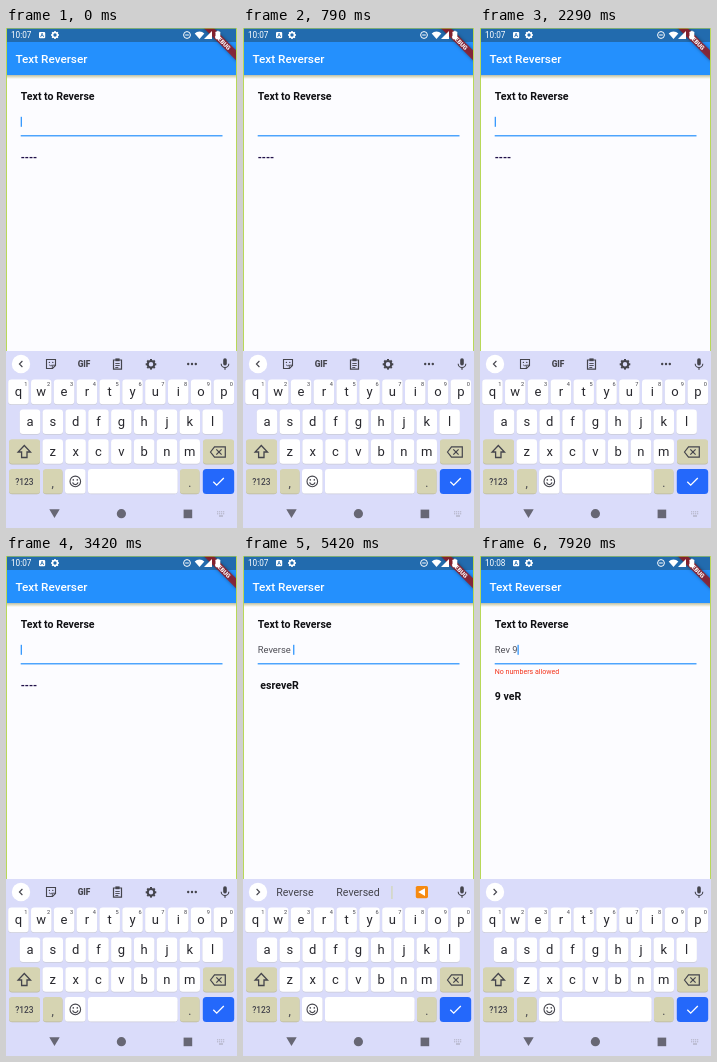
Write an HTML page with a canvas that moves like this. It is 231 by 500 pixels and loops after 8000 ms.

```html
<!DOCTYPE html>
<html lang="en">
<head>
<meta charset="utf-8">
<title>Text Reverser</title>
<style>
html, body { margin: 0; width: 100%; height: 100%; overflow: hidden; background: #fcfcff; }
canvas { display: block; width: 231px; height: 500px; }
</style>
</head>
<body>
<canvas id="stage"></canvas>
<script>
const W = 231, H = 500, LOOP = 8000;
const BLUE = '#2490fd', INK = '#44444c', BOARD = '#dadcfa', TAN = '#d6d4b2';
const canvas = document.getElementById('stage');
const dpr = window.devicePixelRatio || 1;
canvas.width = W * dpr;
canvas.height = H * dpr;
const c = canvas.getContext('2d');

// Time of each edit, field text, suggestions (null shows the tool icons)
const edits = [
  [0, '', null],
  [3920, 'R', ['R', 'Re', 'Really']],
  [4200, 'Re', ['Re', 'Really', 'Ready']],
  [4480, 'Rev', ['Rev', 'Reverse', 'Review']],
  [4680, 'Reve', ['Reve', 'Reverse', 'Revenge']],
  [4860, 'Rever', ['Rever', 'Reverse', 'Revert']],
  [5010, 'Revers', ['Revers', 'Reverse', 'Reversed']],
  [5170, 'Reverse', ['Reverse', 'Reversed', '\u25c0']],
  [5340, 'Reverse ', ['Reverse', 'Reversed', '\u25c0']],
  [6350, 'Reverse', ['Reverse', 'Reversed', '\u25c0']],
  [6510, 'Revers', ['Revers', 'Reverse', 'Reversed']],
  [6670, 'Rever', ['Rever', 'Reverse', 'Revert']],
  [6830, 'Reve', ['Reve', 'Reverse', 'Revenge']],
  [7030, 'Rev', ['Rev', 'Reverse', 'Review']],
  [7250, 'Rev ', []],
  [7640, 'Rev 9', []]
];

function rect(x, y, w, h, fill) {
  c.fillStyle = fill;
  c.fillRect(x, y, w, h);
}

function round(x, y, w, h, r, fill) {
  c.fillStyle = fill;
  c.beginPath();
  c.roundRect(x, y, w, h, r);
  c.fill();
}

function disc(x, y, r, fill) {
  c.fillStyle = fill;
  c.beginPath();
  c.arc(x, y, r, 0, 7);
  c.fill();
}

function ring(x, y, r, stroke, width) {
  c.strokeStyle = stroke;
  c.lineWidth = width;
  c.beginPath();
  c.arc(x, y, r, 0, 7);
  c.stroke();
}

function trace(points) {
  c.beginPath();
  for (let i = 0; i < points.length; i += 2) c.lineTo(points[i], points[i + 1]);
}

function line(points, stroke, width, closed) {
  trace(points);
  if (closed) c.closePath();
  c.strokeStyle = stroke;
  c.lineWidth = width;
  c.stroke();
}

function poly(points, fill) {
  trace(points);
  c.fillStyle = fill;
  c.fill();
}

function text(s, x, y, size, fill, weight = 400, align = 'left') {
  c.font = `${weight} ${size}px Roboto, sans-serif`;
  c.textAlign = align;
  c.fillStyle = fill;
  c.fillText(s, x, y);
}

function gear(x, y, r, color) {
  ring(x, y, r * 0.62, color, r * 0.4);
  for (let i = 0; i < 8; i++) {
    const a = i * Math.PI / 4, u = Math.cos(a), v = Math.sin(a);
    line([x + u * r * 0.7, y + v * r * 0.7, x + u * r, y + v * r], color, r * 0.38);
  }
}

function statusBar(t) {
  rect(0, 0, W, 14, '#226bae');
  text(t < 6250 ? '10:07' : '10:08', 5, 10.4, 8.2, '#fff');
  round(33, 4, 6.2, 6.2, 1, '#fff');
  text('A', 36.1, 9.2, 5.5, '#226bae', 700, 'center');
  gear(49, 7, 4, '#fff');
}

function statusIcons() {
  ring(181, 7, 3.4, '#fff', 1);
  rect(179.2, 6.5, 3.6, 1, '#fff');
  c.fillStyle = '#fff';
  c.beginPath();
  c.moveTo(193.5, 11);
  c.arc(193.5, 10.5, 7, -2.33, -0.81);
  c.fill();
  poly([198, 11, 206, 11, 206, 3], '#fff');
  round(209.5, 3.6, 4.8, 7.6, 0.7, '#fff');
  rect(211, 2.8, 1.8, 1, '#fff');
}

function banner() {
  c.save();
  c.translate(W, 0);
  c.rotate(Math.PI / 4);
  c.shadowColor = 'rgba(0,0,0,.5)';
  c.shadowBlur = 3.5 * dpr;
  rect(-24, 16.5, 48, 7, 'rgba(160,24,28,.78)');
  c.shadowColor = 'transparent';
  text('DEBUG', 0, 22.1, 6, '#fff', 900, 'center');
  c.restore();
}

function appBar() {
  rect(0, 14, W, 33, BLUE);
  const shade = c.createLinearGradient(0, 47, 0, 51);
  shade.addColorStop(0, '#b9bda8');
  shade.addColorStop(0.5, '#e2e0c8');
  shade.addColorStop(1, '#fcfcff');
  rect(0, 47, W, 4, shade);
  text('Text Reverser', 9.4, 34.8, 11.76, '#fff', 500);
}

function field(t, edit) {
  const [since, value] = edit;
  const age = t - since;
  const invalid = /\d/.test(value);
  text('Text to Reverse', 14.7, 71.8, 10.58, '#101014', 700);
  text(value, 14.7, 97, 9.4, '#505058');
  const end = 14.7 + c.measureText(value).width;
  if (value && !value.includes(' ')) rect(14.7, 98.4, end - 14.7, 0.8, '#77784a');
  if (age % 1000 < 500) rect(end, 88.8, 1.2, 10, BLUE);
  rect(14.7, 107.2, 201.8, 1.2, BLUE);
  if (invalid) {
    const k = Math.min(1, age / 167);
    c.globalAlpha = k;
    text('No numbers allowed', 14.7, 117.6 - 2 * (1 - k), 7.06, '#f4341c');
    c.globalAlpha = 1;
  }
  const result = [...value].reverse().join('') || '----';
  text(result, 14.7, invalid ? 143.9 : 132.8, 10.58, value ? '#101014' : '#201048', 700);
}

function microphone(x, y) {
  round(x - 1.8, y - 5.8, 3.6, 7.4, 1.8, INK);
  c.strokeStyle = INK;
  c.lineWidth = 1.1;
  c.beginPath();
  c.arc(x, y - 0.3, 3.8, 0, Math.PI);
  c.stroke();
  rect(x - 0.6, y + 3.4, 1.2, 2.4, INK);
}

function tools() {
  line([40.5, 331.5, 49.5, 331.5, 49.5, 337.5, 46.5, 340.5, 40.5, 340.5], INK, 1.1, true);
  line([49.5, 337.2, 46.3, 337.2, 46.3, 340.5], INK, 0.9);
  disc(43.4, 334.4, 0.7, INK);
  disc(46.8, 334.4, 0.7, INK);
  line([43, 336.8, 44.8, 337.8, 46, 337], INK, 0.8);

  text('GIF', 78, 339.1, 8.3, INK, 900, 'center');

  line([107.5, 332, 115.5, 332, 115.5, 341.2, 107.5, 341.2], INK, 1.2, true);
  rect(109.4, 330.4, 4.2, 2.8, INK);
  for (const y of [335, 337, 339]) rect(109.3, y, y > 338 ? 3 : 4.4, 0.9, INK);

  gear(145, 336.3, 5.3, INK);
  for (const x of [182.2, 186, 189.8]) disc(x, 336, 1.2, INK);
}

function suggestions(words) {
  words.forEach((word, i) => {
    const x = 52 + i * 63;
    if (word === '\u25c0') {
      round(172.8, 330, 12.2, 12.2, 1.6, '#f68a10');
      poly([175.2, 336.1, 182, 332.3, 182, 339.9], '#fff');
    } else {
      text(word, x, 339.9, 10.58, INK, 400, 'center');
    }
  });
  if (words.length) rect(148.5, 330, 0.9, 13, '#cdd49a');
}

function key(x, y, w, fill) {
  round(x, y + 0.7, w, 24.6, 3.2, fill === '#fff' ? '#c9cad8' : '#bbb99f');
  round(x, y, w, 24.6, 3.2, fill);
}

function letters(row, first, y, hints) {
  [...row].forEach((ch, i) => {
    const x = first + i * 22.83;
    key(x - 10.2, y, 20.4, '#fff');
    text(ch, x, y + 16.3, 13, '#28282e', 400, 'center');
    if (hints) text((i + 1) % 10, x + 7.4, y + 6.6, 5.6, INK, 400, 'center');
  });
}

function keyboard(words) {
  rect(0, 323, W, 177, BOARD);
  disc(15, 336, 9.2, '#fff');
  const d = words ? 1 : -1;
  line([15 - d * 1.4, 333, 15 + d * 1.6, 336, 15 - d * 1.4, 339], INK, 1.1);
  if (words) suggestions(words);
  else tools();
  microphone(219, 336);

  letters('qwertyuiop', 12.4, 351.6, true);
  letters('asdfghjkl', 24, 381.4);
  letters('zxcvbnm', 46.8, 411.2);

  key(3, 411.2, 31, TAN);
  line([18.3, 417.5, 24.5, 424, 21, 424, 21, 429.5, 15.6, 429.5, 15.6, 424, 12.1, 424], INK, 1.3, true);
  key(197, 411.2, 31, TAN);
  line([204.5, 424, 208.5, 418.8, 219.3, 418.8, 219.3, 429.2, 208.5, 429.2], INK, 1.2, true);
  line([210.3, 421.4, 215.6, 426.7], INK, 1.2);
  line([215.6, 421.4, 210.3, 426.7], INK, 1.2);

  key(3, 441, 31, TAN);
  text('?123', 18.4, 456.8, 8.4, INK, 500, 'center');
  key(37, 441, 19.5, TAN);
  text(',', 46.8, 458.5, 12, INK, 400, 'center');
  key(59, 441, 20.5, '#fff');
  ring(69.3, 453.4, 5.3, INK, 1.1);
  disc(67.3, 451.9, 0.8, INK);
  disc(71.3, 451.9, 0.8, INK);
  c.beginPath();
  c.arc(69.3, 453.9, 2.7, 0.2, Math.PI - 0.2);
  c.stroke();
  key(82, 441, 89.6, '#fff');
  key(174, 441, 19.5, TAN);
  text('.', 183.8, 458.5, 12, INK, 400, 'center');
  round(196.8, 441, 31.4, 25, 3.5, '#2468fb');
  line([207.3, 453.8, 210.7, 457.2, 217.8, 450], '#fff', 1.3);

  const nav = '#676774';
  poly([43.3, 481.3, 53.7, 481.3, 48.5, 490], nav);
  disc(115.4, 485.7, 4.6, nav);
  rect(177.6, 481.6, 8.6, 8.6, nav);
  for (let i = 0; i < 8; i++) {
    rect(211.2 + (i % 4) * 2, 483.3 + (i >> 2) * 2, 1, 1, '#a4a4b2');
  }
  rect(213, 487.5, 4, 1, '#a4a4b2');
}

function edges() {
  const lime = '#b8d858';
  rect(0, 0, 1, 323, lime);
  rect(W - 1, 0, 1, 323, lime);
  c.globalAlpha = 0.6;
  rect(0, 0, W, 1, lime);
  c.globalAlpha = 1;
}

function draw(t) {
  const edit = edits.findLast(e => e[0] <= t);
  c.setTransform(dpr, 0, 0, dpr, 0, 0);
  rect(0, 0, W, H, '#fcfcff');
  statusBar(t);
  appBar();
  banner();
  statusIcons();
  field(t, edit);
  keyboard(edit[2]);
  edges();
}

const start = performance.now();
function tick() {
  draw((performance.now() - start) % LOOP);
  requestAnimationFrame(tick);
}
tick();
</script>
</body>
</html>
```
